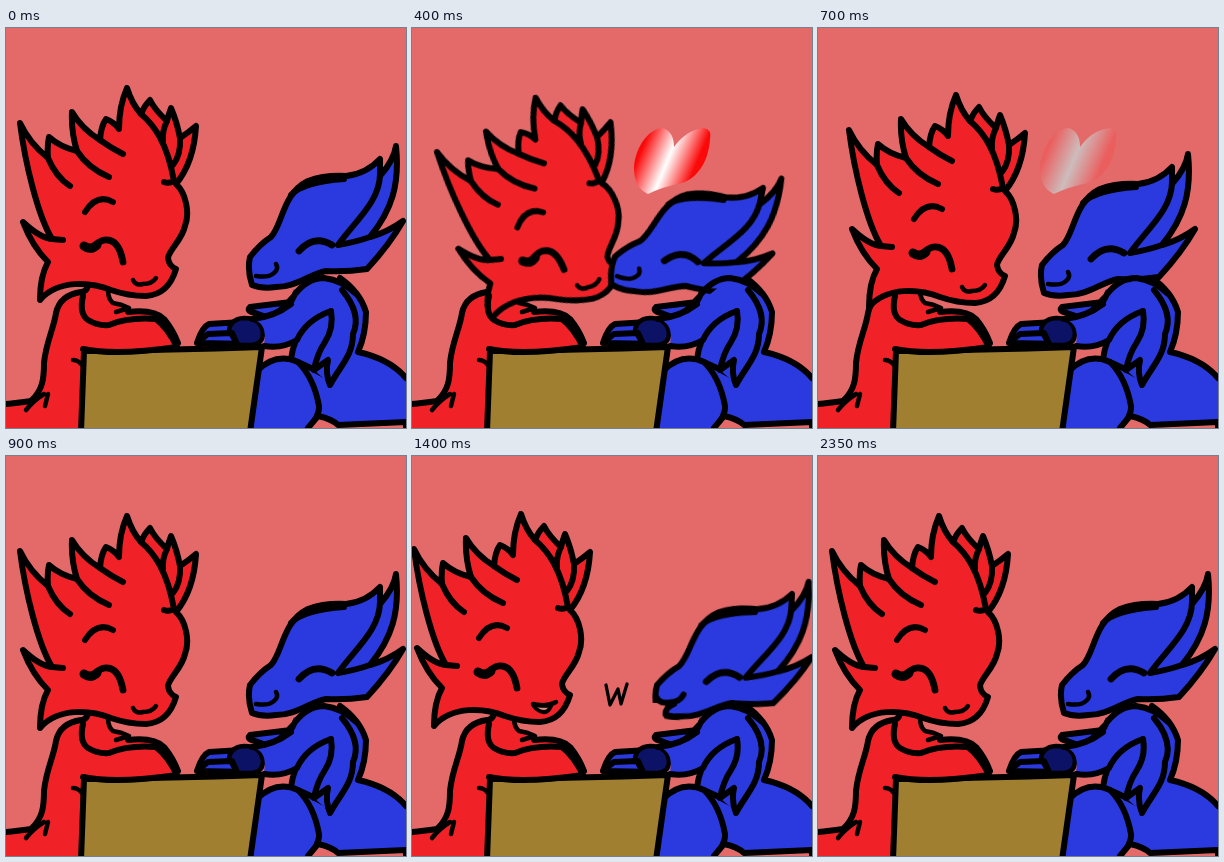
These frames come from a looping animation (400x400 px, 2.45 s). An HTML page:

```html
<!DOCTYPE html>
<html lang="en">
<head>
<meta charset="utf-8">
<title>Two dragons</title>
<style>
html, body { margin: 0; width: 100%; height: 100%; overflow: hidden; background: #e46a6a; }
svg { display: block; width: 100vw; height: 100vh; }
path { stroke: #000; stroke-width: 6; stroke-linecap: round; stroke-linejoin: round; fill: none; }
.red { fill: #f02228; }
.blue { fill: #2a3ade; }
.navy { fill: #0c1266; }
.tan { fill: #a08030; }
.skin { fill: #e46a6a; }
.flat { stroke: none; }
.thin { stroke-width: 4.5; }
.bold { stroke-width: 6.8; }
.thick { stroke-width: 9; }
.tongue { fill: #d98a7c; stroke-width: 4; }
.word path { stroke-width: 3.3; }

/* Every part steps on the same 2450 ms loop. */
.anim, .anim stop { animation: 2450ms step-end infinite; }
.red-head { animation-name: redHead; }
.blue-head { animation-name: blueHead; }
.smile { animation-name: smile; }
.open { animation-name: open; }
.heart { animation-name: heart; }
.anim .edge { animation-name: edge; }
.anim .glow { animation-name: glow; }
.word { visibility: hidden; }
.i { animation-name: wordI; }
.w { animation-name: wordW; }
.u { animation-name: wordU; }
.v { animation-name: wordV; }
.you { animation-name: wordYou; }

@keyframes redHead {
  0%, 36.73%, 95.91%, 100% { transform: none; }
  4.08%, 32.65% { transform: translate(8px, 3px); }
  8.16%, 28.57% { transform: translate(17px, 7px); }
  12.24%, 24.48% { transform: translate(28px, 113px) rotate(-5.3deg) translate(-14px, -95px); }
  16.32% { transform: translate(25px, 124px) rotate(-10.7deg) translate(-14px, -95px); }
  40.81% { transform: translate(-6px, -1px); }
  44.89% { transform: translate(-12px, -2px); }
}
@keyframes blueHead {
  0%, 36.73%, 95.91%, 100% { transform: none; }
  4.08%, 32.65% { transform: translate(-10px, 4px); }
  8.16%, 28.57% { transform: translate(-20px, 8px); }
  12.24%, 24.48% { transform: translate(352px, 149px) rotate(6deg) translate(-374px, -131px); }
  16.32% { transform: translate(351px, 160px) rotate(12.2deg) translate(-374px, -131px); }
  40.81% { transform: translate(377px, 134px) rotate(1.5deg) translate(-374px, -131px); }
  44.89% { transform: translate(380px, 138px) rotate(3deg) translate(-374px, -131px); }
}
@keyframes smile { 0%, 95.91%, 100% { visibility: visible; } 44.89% { visibility: hidden; } }
@keyframes open { 0%, 95.91%, 100% { visibility: hidden; } 44.89% { visibility: visible; } }
@keyframes heart { 0%, 36.73%, 100% { visibility: hidden; } 16.32% { visibility: visible; } }
@keyframes edge {
  0%, 100% { stop-color: #fb0808; }
  24.48% { stop-color: #f43434; }
  28.57% { stop-color: #eb5e5e; }
  32.65% { stop-color: #e76565; }
}
@keyframes glow {
  0%, 100% { stop-color: #fff; }
  24.48% { stop-color: #e8e0e0; }
  28.57% { stop-color: #cdbcbc; }
  32.65% { stop-color: #da9494; }
}
@keyframes wordI { 0%, 57.14%, 100% { visibility: hidden; } 44.89% { visibility: visible; } }
@keyframes wordW { 0%, 61.22%, 100% { visibility: hidden; } 57.14% { visibility: visible; } }
@keyframes wordU { 0%, 65.3%, 100% { visibility: hidden; } 61.22% { visibility: visible; } }
@keyframes wordV { 0%, 75.51%, 100% { visibility: hidden; } 65.3% { visibility: visible; } }
@keyframes wordYou { 0%, 95.91%, 100% { visibility: hidden; } 75.51% { visibility: visible; } }
</style>
</head>
<body>
<svg viewBox="0 0 400 400">
  <defs>
    <linearGradient id="shine" class="anim" gradientUnits="userSpaceOnUse" x1="225" y1="118" x2="290" y2="145">
      <stop class="edge" offset=".08" stop-color="#fb0808"/>
      <stop class="glow" offset=".48" stop-color="#fff"/>
      <stop class="edge" offset=".88" stop-color="#fb0808"/>
    </linearGradient>
  </defs>
  <rect width="400" height="400" fill="#e46a6a"/>

  <!-- red body -->
  <path class="red flat" d="M82 256 L104 262 L107 276 L124 283 Q148 281 159 292 L172 320 L80 326 V400 H0 V376 Q10 375 25 373 C37 362 38 350 38 335 C40 318 48 300 50 285 Q55 265 78 264 Z"/>
  <path d="M82 258 Q80 264 75 264 Q54 267 50 285 C48 300 40 314 38 335 C38 350 37 362 25 373 Q10 375 0 376"/>
  <path class="thin" d="M38 366 Q27 373 20 382 M42 366 L39 378 M67 332 Q72 332 76 337"/>
  <path class="thin" d="M102 262 Q102 271 107 275 Q115 276 123 280 L110 284"/>
  <path d="M122 284 Q148 281 158 291 Q167 302 172 315"/>

  <!-- blue body -->
  <path class="blue flat" d="M287 262 L318 250 Q345 254 358 276 Q361 300 352 324 Q384 332 400 350 V394 L332 398 L312 388 L304 400 H246 L251 343 Q270 324 286 332 L290 312 Z"/>
  <path d="M334 250 Q354 264 360 284 Q360 306 352 324 Q384 331 400 350"/>
  <path d="M290 312 Q286 322 285 331 M251 343 Q270 324 292 334 Q308 350 313 378 Q314 387 303 400"/>
  <path class="skin" d="M302 400 L312 388 Q326 391 332 397 L400 394 V404 H302"/>
  <path d="M292 334 Q306 340 318 347"/>

  <g class="anim red-head">
    <path class="red" d="M14 95 C22 112 32 122 42 130 Q41 118 43 109 Q54 119 71 123 Q65 104 66 84 Q76 101 94 112 Q95 98 100 91 Q108 94 113 101 Q113 78 121 60 Q126 76 135 86 Q138 78 144 72 Q149 82 161 93 Q163 85 165 80 Q171 94 174 110 Q183 104 190 98 Q188 134 170 156 C180 165 184 185 179 198 C176 212 163 222 162 230 Q163 238 170 241 C165 258 155 267 140 268 Q122 268 105 262 C85 254 52 251 34 272 Q34 248 42 234 Q26 218 17 194 Q34 210 46 211 C32 188 19 135 14 95 Z"/>
    <path d="M42 130 Q50 149 64 158 M71 123 Q82 140 103 149 M94 112 Q105 120 117 126 M46 211 L57 212"/>
    <path d="M135 86 C148 97 161 114 168 153 Q163 156 158 154 M161 93 Q156 103 157 113 M174 110 Q175 127 167 137"/>
    <path d="M79 184 Q91 165 107 174"/>
    <path class="thick" d="M78 218 Q85 223 91 217"/>
    <path class="bold" d="M90 217 C96 210 112 206 117 234"/>
    <path class="thin anim smile" d="M127 252 Q130 258 137 256 Q146 256 150 250"/>
    <g class="anim open">
      <path class="tongue" d="M133 251 Q141 250 151 252 Q148 259 143 258 Q137 257 133 251 Z"/>
      <path class="thin" d="M133 250 Q145 254 156 248"/>
    </g>
  </g>

  <g class="anim blue-head">
    <path class="blue" d="M246 257 Q241 242 244 229 Q254 216 265 209 C277 196 276 166 302 153 Q318 147 340 148 Q360 146 374 131 L374 148 Q388 132 390 118 C394 156 386 182 364 209 Q382 204 397 193 Q384 216 361 241 Q340 244 320 243 C302 247 290 259 270 259 Q256 261 246 257 Z"/>
    <path d="M285 167 Q297 154 338 151"/>
    <path d="M374 146 C374 174 348 194 332 217 Q350 214 364 209"/>
    <path class="bold" d="M293 223 Q308 206 326 217"/>
    <path class="thin anim smile" d="M250 248 Q263 250 268 245 Q273 241 270 236"/>
    <g class="anim open">
      <path class="skin flat" d="M238 247 L262 247 L252 263 L238 265 Z"/>
      <path d="M244 241 Q246 247 256 246 Q268 245 271 237 M262 247 Q253 251 254 258 Q260 261 270 259"/>
    </g>
  </g>

  <!-- table -->
  <path class="tan" d="M78 323 Q165 322 256 319 L244 404 H75 Z"/>

  <!-- red arm -->
  <path class="red flat" d="M77 270 Q73 286 82 292 Q92 298 103 297 Q122 289 150 291 Q162 300 172 320 Q110 327 77 322 Q60 300 77 270 Z"/>
  <path d="M77 268 Q73 286 82 292 Q92 298 103 297 Q122 289 150 291 Q162 300 171 319 Q110 328 77 321"/>

  <!-- blue arms -->
  <path class="blue" d="M288 268 L285 274 L244 279 Q240 283 249 285 L266 291 Z"/>
  <path class="blue" d="M191 315 Q196 299 203 296 L236 294 L244 316 Z"/>
  <path class="navy thin" d="M223 303 Q224 291 238 290 Q255 290 257 305 Q257 316 246 317 L231 317 Z"/>
  <path d="M192 314 L202 306 L226 305 L231 316"/>
  <path class="blue flat" d="M286 276 L318 250 Q340 250 350 266 L324 356 L308 342 L325 284 Q300 292 290 314 Q270 322 258 316 Q262 296 247 291 Z"/>
  <path d="M285 276 Q268 289 246 291 M325 283 Q300 292 291 312 Q276 321 258 318"/>
  <path d="M289 266 Q302 250 318 250 Q336 252 350 266"/>
  <path d="M325 283 Q328 300 319 314 Q311 326 308 342 L322 332 Q319 345 324 357 C334 338 347 328 347 306 Q356 286 336 262"/>

  <path class="flat anim heart" style="fill:url(#shine)" d="M236 166 Q222 160 222 140 C223 118 238 100 251 100 Q262 104 262 119 Q274 102 292 100 Q300 101 298 112 C296 135 285 150 270 155 Q250 159 236 166 Z"/>

  <!-- hand lettering -->
  <g class="word anim i" aria-label="I"><path d="M196 229 H209 M203 229 L202 249 M195 250 H209"/></g>
  <g class="word anim w" aria-label="W"><path d="M194 229 L198 249 L206 233 L209 248 L215 228"/></g>
  <g class="word anim u" aria-label="U"><path d="M195 229 Q192 249 202 249 Q211 248 212 229 M212 229 L213 250"/></g>
  <g class="word anim v" aria-label="V"><path d="M194 229 L203 250 L213 228"/></g>
  <g class="word anim you" aria-label="You"><path d="M169 230 Q171 239 180 239 M189 230 Q184 242 175 252 M201 236 Q193 237 194 244 Q196 250 203 249 Q210 246 208 239 Q206 235 201 236 M214 236 Q212 249 220 249 Q228 248 229 236 Q227 246 232 249"/></g>
</svg>
</body>
</html>
```
